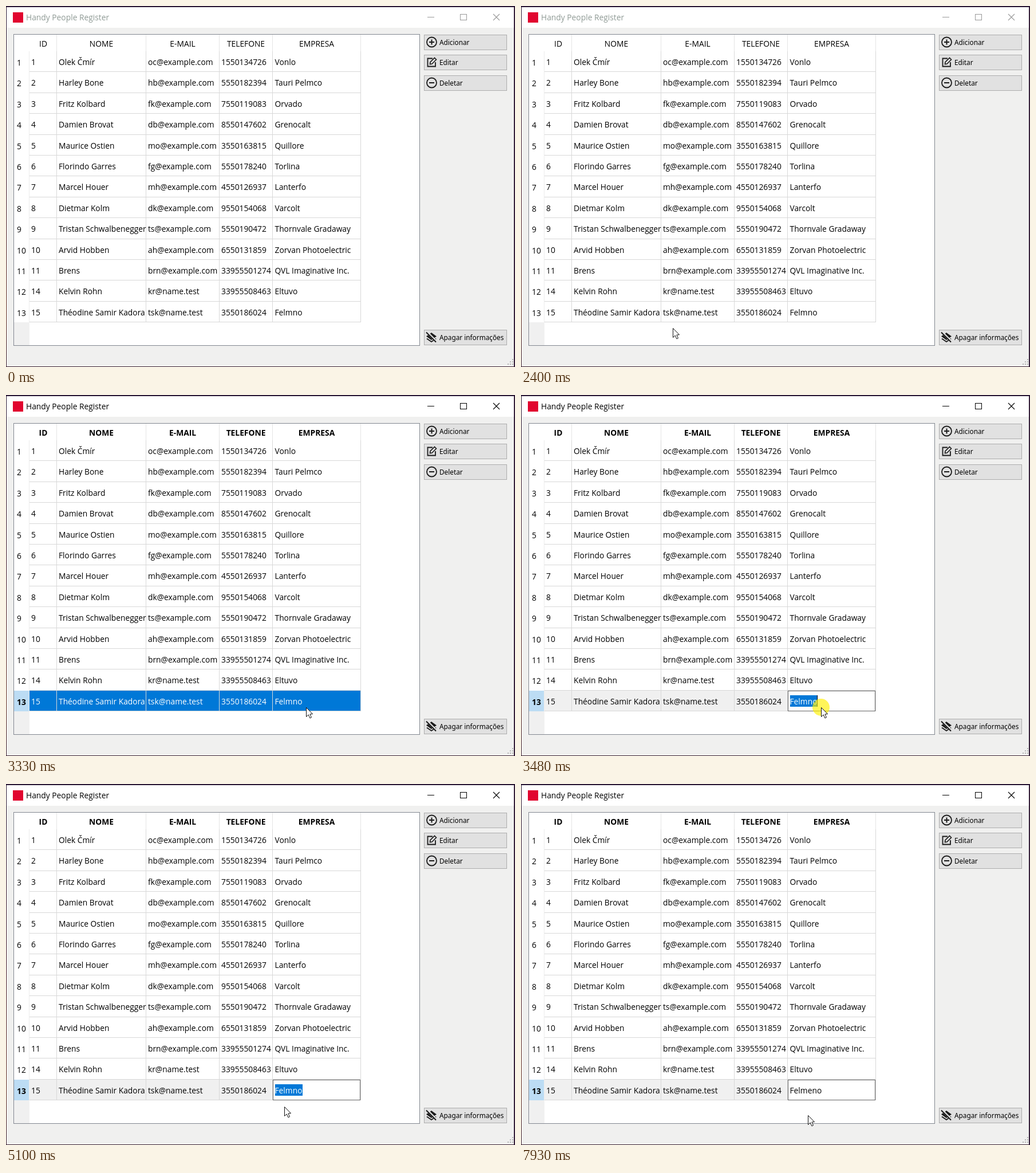
These frames come from a looping animation (889x630 px, 8000 ms). An HTML page with a canvas:

```html
<!DOCTYPE html>
<html lang="pt">
<head>
<meta charset="utf-8">
<title>Contacts</title>
<style>
  html, body { margin: 0; width: 100%; height: 100%; overflow: hidden; }
  canvas { display: block; }
</style>
</head>
<body>
<canvas id="stage" width="889" height="630"></canvas>
<script>
const ctx = document.getElementById('stage').getContext('2d');
const LOOP = 8000;
const FACE = '"Open Sans", "Noto Sans", sans-serif';
const REGULAR = `13.8px ${FACE}`;
const BOLD = `bold 13.8px ${FACE}`;
const BUTTON = '11.8px "Noto Sans", sans-serif';

// Moments of the interaction
const FIRST_CLICK = 3190, EDIT_OPEN = 3400, BEAM_SHOWN = 3610;
const CARET_CLICK = 6140, TYPED = 7340;
const CLICKS = [[3190, 3280], [3390, 3610], [6140, 6250]];

const ROW_TOP = 79, ROW_H = 36.4;
const EDGES = [41, 88, 244, 372, 465, 619];
const CELL_X = [44, 92, 248, 376, 469.5];
const HEADERS = ['ID', 'NOME', 'E-MAIL', 'TELEFONE', 'EMPRESA'];
const ROWS = [
  ['1', 'Olek Čmír', 'oc@example.com', '1550134726', 'Vonlo'],
  ['2', 'Harley Bone', 'hb@example.com', '5550182394', 'Tauri Pelmco'],
  ['3', 'Fritz Kolbard', 'fk@example.com', '7550119083', 'Orvado'],
  ['4', 'Damien Brovat', 'db@example.com', '8550147602', 'Grenocalt'],
  ['5', 'Maurice Ostien', 'mo@example.com', '3550163815', 'Quillore'],
  ['6', 'Florindo Garres', 'fg@example.com', '5550178240', 'Torlina'],
  ['7', 'Marcel Houer', 'mh@example.com', '4550126937', 'Lanterfo'],
  ['8', 'Dietmar Kolm', 'dk@example.com', '9550154068', 'Varcolt'],
  ['9', 'Tristan Schwalbenegger', 'ts@example.com', '5550190472', 'Thornvale Gradaway'],
  ['10', 'Arvid Hobben', 'ah@example.com', '6550131859', 'Zorvan Photoelectric'],
  ['11', 'Brens', 'brn@example.com', '33955501274', 'QVL Imaginative Inc.'],
  ['14', 'Kelvin Rohn', 'kr@name.test', '33955508463', 'Eltuvo'],
  ['15', 'Théodine Samir Kadora', 'tsk@name.test', '3550186024', 'Felmno']
];
const LAST = ROWS.length - 1;
const STEM = 'Felm';

// Pointer moves: start, end, number of steps, then the points passed
const MOVES = [
  [490, 1050, 12, [332, 626], [296, 594], [241, 563]],
  [1760, 1760, 1, [241, 563], [240, 562]],
  [2400, 2960, 13, [240, 562], [322, 562], [412, 558], [475, 554], [522, 545]],
  [3190, 3190, 1, [522, 545], [524, 545]],
  [4000, 4210, 6, [524, 546], [503, 539]],
  [4360, 4360, 1, [503, 539], [502, 539]],
  [4510, 4740, 5, [502, 539], [472, 569]],
  [5020, 5280, 7, [472, 569], [496, 558], [502, 538]],
  [6260, 6430, 4, [502, 538], [501, 578]]
];

function along(points, u) {
  const f = u * (points.length - 1);
  const i = Math.min(Math.floor(f), points.length - 2);
  const [a, b] = [points[i], points[i + 1]];
  return a.map((v, k) => Math.round(v + (b[k] - v) * (f - i)));
}

function pointerAt(t) {
  const move = MOVES.filter(m => t >= m[0]).pop();
  if (!move) return null;
  const [start, end, steps, ...points] = move;
  const done = t >= end ? steps : Math.floor((t - start) / (end - start) * (steps - 1)) + 1;
  return along(points, done / steps);
}

// The caret flips at each of these times
function caretOn(t) {
  const flips = [EDIT_OPEN, 4000, 4510, 5020, 5580, 6090, 6600, 7110, TYPED, 7930];
  return flips.filter(f => t >= f).length % 2 === 1;
}

function rect(x, y, w, h, color) {
  ctx.fillStyle = color;
  ctx.fillRect(x, y, w, h);
}

function box(x, y, w, h, fill, border) {
  rect(x, y, w, h, border);
  rect(x + 1, y + 1, w - 2, h - 2, fill);
}

function text(str, x, y, color = '#000', font = REGULAR, align = 'left') {
  ctx.font = font;
  ctx.textAlign = align;
  ctx.fillStyle = color;
  ctx.fillText(str, x, y);
}

function polyline(points, width, color, close) {
  ctx.beginPath();
  points.forEach(([x, y]) => ctx.lineTo(x, y));
  if (close) ctx.closePath();
  ctx.lineWidth = width;
  ctx.strokeStyle = color;
  ctx.stroke();
}

function polygon(points, color) {
  ctx.beginPath();
  points.forEach(([x, y]) => ctx.lineTo(x, y));
  ctx.closePath();
  ctx.fillStyle = color;
  ctx.fill();
}

function drawWindow(active) {
  const desk = ctx.createLinearGradient(0, 0, 0, 630);
  desk.addColorStop(0, '#2a1a35');
  desk.addColorStop(0.5, '#4a2030');
  desk.addColorStop(0.85, '#6b3426');
  desk.addColorStop(1, '#3a2030');
  rect(0, 0, 889, 630, desk);
  rect(887, 0, 2, 630, '#35203a');
  rect(0, 0, 889, 2, '#2a1836');
  rect(1, 2, 886, 627, '#f0f0ef');
  rect(1, 2, 886, 36, '#fff');

  rect(12, 11, 18, 18, '#e1062f');
  const ink = active ? '#000' : '#999';
  text('Handy People Register', 35, 25, active ? '#000' : '#8f9a95');
  rect(736, 19, 12, 1, ink);
  ctx.lineWidth = 1;
  ctx.strokeStyle = ink;
  ctx.strokeRect(793.5, 14.5, 11, 10);
  polyline([[851, 14], [862, 25]], 1.1, ink);
  polyline([[862, 14], [851, 25]], 1.1, ink);

  for (let i = 0; i < 3; i++)
    for (let j = 0; j <= i; j++)
      rect(884 - j * 4, 616 + i * 4, 2, 2, '#b4b4b4');
}

function drawButton(y, label, icon) {
  box(730, y, 145, 27, '#e1e1e1', '#adadad');
  text(label, 757, y + 18, '#000', BUTTON);
  ctx.save();
  ctx.translate(743, y + 13);
  icon();
  ctx.restore();
}

function ring() {
  ctx.beginPath();
  ctx.arc(0.5, 0, 8.5, 0, Math.PI * 2);
  ctx.lineWidth = 1.8;
  ctx.strokeStyle = '#1b1b1b';
  ctx.stroke();
  rect(-4, -1, 9, 2, '#1b1b1b');
}

function plusIcon() {
  ring();
  rect(-0.5, -4.5, 2, 9, '#1b1b1b');
}

function editIcon() {
  polyline([[2, -6.5], [-6.5, -6.5], [-6.5, 7.5], [7, 7.5], [7, 0]], 1.8, '#1b1b1b');
  polyline([[-2.5, 3.5], [-2, 0], [5.5, -7.5], [8.5, -4.5], [1, 3]], 1.6, '#1b1b1b', true);
}

function layersOffIcon() {
  polygon([[0, -8], [9, -1.5], [0, 5], [-9, -1.5]], '#1b1b1b');
  polyline([[-8, 2.5], [0, 8], [8, 2.5]], 1.8, '#1b1b1b');
  polyline([[-8, -9], [9, 8]], 4, '#e1e1e1');
  polyline([[-9, -8.5], [8, 8.5]], 1.9, '#1b1b1b');
}

function drawTable(active, editing) {
  box(13, 49, 710, 544, '#fff', '#828790');
  rect(14, 552, 27, 40, '#f0f0f0');

  const lastTop = Math.round(ROW_TOP + ROW_H * LAST);
  if (active) {
    rect(14, lastTop, 27, 36, '#bcdcf4');
    rect(41, lastTop, 578, 36, editing ? '#f0f0f0' : '#0078d7');
  }

  EDGES.slice(1).forEach(x => {
    rect(x, 50, 1, 29, '#e5e5e5');
    rect(x, 79, 1, 473, '#d8d8d8');
  });
  rect(40, 79, 1, 473, '#ececec');
  HEADERS.forEach((h, i) => {
    text(h, (EDGES[i] + EDGES[i + 1]) / 2 + 0.5, 71, '#000', active ? BOLD : REGULAR, 'center');
  });

  ROWS.forEach((row, r) => {
    const base = Math.round(103 + ROW_H * r);
    const chosen = active && r === LAST;
    rect(41, Math.round(ROW_TOP + ROW_H * (r + 1)) - 1, 579, 1, '#d8d8d8');
    text(String(r + 1), 19, base + 1, '#000', chosen ? BOLD : REGULAR);
    row.forEach((value, c) => {
      if (editing && chosen && c === 4) return;
      text(value, CELL_X[c], base, chosen && !editing ? '#fff' : '#000');
    });
  });
}

function drawEditor(t) {
  const selected = t < CARET_CLICK;
  const typed = t >= TYPED;
  const value = STEM + (typed ? 'e' : '') + 'no';
  const x = CELL_X[4];
  box(466, 516, 153, 36, '#fff', '#646464');
  ctx.font = REGULAR;
  const width = ctx.measureText(value).width;
  if (selected) rect(470, 524, Math.round(width), 20, '#0078d7');
  text(value, x, 540, selected ? '#fff' : '#000');
  if (caretOn(t)) {
    const before = selected ? value : typed ? STEM + 'e' : STEM;
    rect(Math.round(x + ctx.measureText(before).width), 524, 1, 20, '#000');
  }
}

function drawArrow(x, y) {
  ctx.save();
  ctx.translate(x + 0.5, y + 0.5);
  const shape = [[0, 0], [0, 16], [3.7, 12.5], [6.4, 18.4], [9, 17.2], [6.4, 11.5], [11, 11.2]];
  polygon(shape, '#fff');
  polyline(shape, 1, '#111', true);
  ctx.restore();
}

function drawBeam(x, y) {
  ctx.save();
  ctx.globalCompositeOperation = 'difference';
  rect(x, y - 6, 1, 13, '#fff');
  [y - 7, y + 7].forEach(end => {
    rect(x - 3, end, 3, 1, '#fff');
    rect(x + 1, end, 3, 1, '#fff');
  });
  ctx.restore();
}

function drawPointer(t) {
  const point = pointerAt(t);
  if (!point) return;
  const [x, y] = point;
  if (CLICKS.some(([down, up]) => t >= down && t < up)) {
    ctx.beginPath();
    ctx.arc(x, y, 15, 0, Math.PI * 2);
    ctx.fillStyle = 'rgba(255, 240, 0, 0.65)';
    ctx.fill();
  }
  if (t >= BEAM_SHOWN && y < 552) drawBeam(x, y);
  else drawArrow(x, y);
}

function draw(t) {
  const active = t >= FIRST_CLICK;
  const editing = t >= EDIT_OPEN;
  drawWindow(active);
  drawTable(active, editing);
  drawButton(50, 'Adicionar', plusIcon);
  drawButton(85, 'Editar', editIcon);
  drawButton(121, 'Deletar', ring);
  drawButton(565, 'Apagar informações', layersOffIcon);
  if (editing) drawEditor(t);
  drawPointer(t);
}

const begin = performance.now();
function tick() {
  draw((performance.now() - begin) % LOOP);
  requestAnimationFrame(tick);
}
tick();
</script>
</body>
</html>
```
